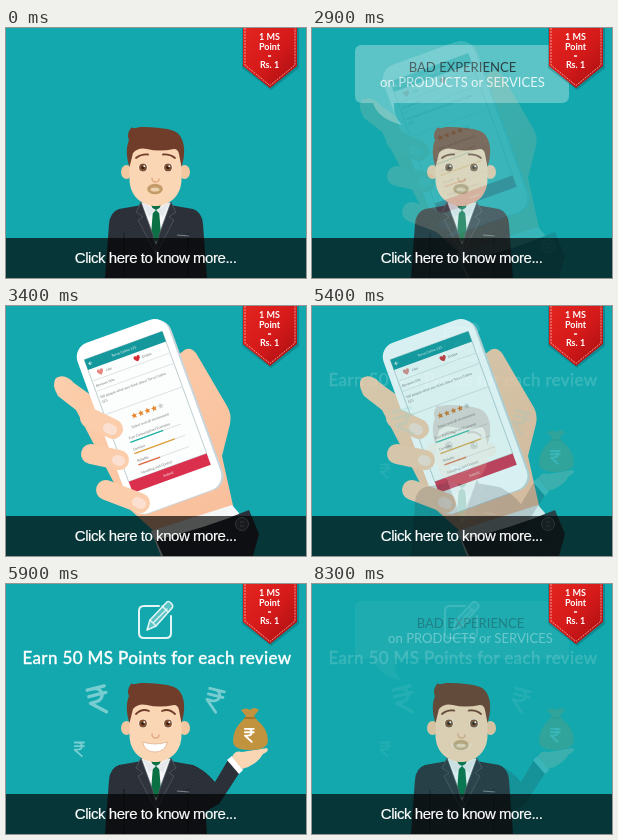
These frames come from a looping animation (300 by 250 pixels, 8400 ms). An HTML page:

```html
<!DOCTYPE html>
<html lang="en">
<head>
<meta charset="utf-8">
<title>Review rewards banner</title>
<style>
html, body { margin: 0; width: 100%; height: 100%; overflow: hidden; background: #12a8ad; }
svg { display: block; width: 300px; height: 250px; }
text { font-family: Lato, "Open Sans", sans-serif; }
.mid { text-anchor: middle; }
.line { fill: none; stroke-linecap: round; stroke-linejoin: round; }
#screen text { font-size: 3.5px; fill: #777; }
#screen .light { fill: #fff; }
</style>
</head>
<body>
<svg viewBox="0 0 300 250">
<defs>
  <pattern id="cloth" width="2" height="2" patternUnits="userSpaceOnUse" patternTransform="rotate(35)">
    <rect width="2" height="2" fill="#282c34"/><rect width=".8" height="1" fill="#3a4049"/>
  </pattern>
  <linearGradient id="red" x2="1" y2="1">
    <stop offset="0" stop-color="#e4251f"/><stop offset=".5" stop-color="#d51a1a"/><stop offset="1" stop-color="#a50d10"/>
  </linearGradient>
  <linearGradient id="skin" x2="1" y2="1">
    <stop offset="0" stop-color="#fdd0ad"/><stop offset="1" stop-color="#f8bd9a"/>
  </linearGradient>
  <path id="rupee" class="line" d="M-6-9H7M-6-4H7M-6-9H-2C6-9 6 1-2 1H-6L4 10"/>
  <path id="heart" d="M0 3C-6-1-2-5 0-2 2-5 6-1 0 3Z"/>
  <path id="star" d="M0-3 .9-1 3-.8 1.4.6 1.9 2.8 0 1.6-1.9 2.8-1.4.6-3-.8-.9-1Z"/>

  <g id="man">
    <path d="M136 177 113 181Q104 184 103 196L99 250H201L197 196Q196 184 187 181L164 177Z" fill="url(#cloth)"/>
    <path d="M118 205V250M182 205V250" stroke="#171a20" fill="none"/>
    <path d="M135 175 150 217 165 175Z" fill="#f6f7f8"/>
    <path d="M141 165H159V175L150 182 141 175Z" fill="#ecc19b"/>
    <path d="M145 176H155L153 182 155 207 150 214 145 207 147 182Z" fill="#0b7044"/>
    <path d="M135 174 130 184 137 189 132 192 150 226 147 207ZM165 174 170 184 163 189 168 192 150 226 153 207Z" fill="#30353d" stroke="#565d66" stroke-width=".7"/>
    <path d="M136 174 150 182 143 189ZM164 174 150 182 157 189Z" fill="#e6e9ec"/>
    <path d="M171 207 183 208" stroke="#7c848c"/>
    <ellipse cx="120.500" cy="144" rx="5.5" ry="7" fill="#f3c7a0"/>
    <ellipse cx="178.500" cy="144" rx="5.5" ry="7" fill="#f3c7a0"/>
    <path d="M123.500 115H175.500V151C175.500 169 162 178 149.500 178S123.500 169 123.500 151Z" fill="#fbd6b4"/>
    <path d="M123.500 139C120 128 120 119 123 112 121 108 122 103 126 99 126 101 130 100 134 99 148 99 160 100 168 103 178 107 181 123 175.500 139L173 126Q172 121 168 121 153 124 141 121 132 119 127 125Z" fill="#703d2a"/>
    <g fill="#fff"><circle cx="137" cy="139.500" r="4.6"/><circle cx="162" cy="139.500" r="4.6"/></g>
    <g fill="#84502f"><circle cx="137" cy="139.500" r="3.9"/><circle cx="162" cy="139.500" r="3.9"/></g>
    <g fill="#3a2116"><circle cx="137" cy="139.500" r="1.8"/><circle cx="162" cy="139.500" r="1.8"/></g>
    <g fill="#fff"><circle cx="138.300" cy="138.200" r="1"/><circle cx="163.300" cy="138.200" r="1"/></g>
    <path class="line" d="M146 150Q146 154 149.500 154T153 151" stroke="#e3ad85" stroke-width="1.5"/>
  </g>
</defs>

<g id="sad">
  <use href="#man"/>
  <path class="line" d="M130 130Q135 126 142 126.500M157 126.500Q164 126 169 130" stroke="#703d2a" stroke-width="1.8"/>
  <ellipse cx="149" cy="161" rx="7.800" ry="5.2" fill="#c49c6a"/>
  <ellipse cx="149" cy="161.500" rx="4.5" ry="2" fill="#edd0ae"/>
</g>

<g id="talk" fill="#fff">
  <path fill-opacity=".45" d="M50 17H250Q257 17 257 24V68Q257 75 250 75H82Q81 89 90 97 66 91 61 75H50Q43 75 43 68V24Q43 17 50 17Z"/>
</g>
<g id="words" class="mid" font-size="13.1">
  <text x="150.5" y="44" fill="#22292b">BAD EXPERIENCE</text>
  <text x="150.5" y="59" fill="#fff">on PRODUCTS or SERVICES</text>
</g>

<g id="earn">
  <g class="line" stroke="#e2f5f5" stroke-width="2">
    <path d="M153 22H138Q133 22 133 27V49Q133 54 138 54H160Q165 54 165 49V32"/>
    <path d="M141 46 144 36 160 19Q162 16 165 19T166 24L150 42Z" fill="#fff" fill-opacity=".3" stroke-width="1.6"/>
    <path d="M156 22 162 28M144 36 150 42M147 39 161 25" stroke-width="1.4"/>
  </g>
  <text class="mid" x="151" y="80" font-size="17" font-weight="500" letter-spacing=".35" fill="#fff" stroke="#fff" stroke-width=".35">Earn 50 MS Points for each review</text>
</g>

<g id="phone">
  <path d="M176 46Q183 39 190 47L221 100Q226 108 224 118L216 150 228 204 160 236 120 200 70 104 52 90Q45 78 50 72 59 67 68 77L100 100Z" fill="url(#skin)"/>
  <path d="M145 225 226 199 233 207 236 250H155Z" fill="#f4f6f7"/>
  <path d="M150 234Q200 222 243 204L253 228 247 250H157Z" fill="url(#cloth)"/>
  <g stroke="#9aa3aa"><circle cx="236" cy="218" r="6.5" fill="#4a525b"/><path d="M234 216H238M234 220H238"/></g>
  <g id="screen" transform="translate(142 106) rotate(-20)">
    <rect x="-48" y="-84" width="98" height="180" rx="15" fill="#c9d5da"/>
    <rect x="-49" y="-86" width="97" height="181" rx="15" fill="#fff"/>
    <rect x="-42" y="-71" width="83" height="130" fill="#fcfdfd" stroke="#9fb5b8" stroke-width=".6"/>
    <rect x="-42" y="-71" width="83" height="11" fill="#15989c"/>
    <path class="line" d="M-36-65.500H-39L-37.500-67M-39-65.500-37.500-64" stroke="#fff" stroke-width=".6"/>
    <text class="mid light" x="-2" y="-64">Torvo Calino 125</text>
    <use href="#heart" x="-31" y="-54" fill="#e58a83"/>
    <use href="#heart" x="8" y="-54" fill="#d42c30"/>
    <text x="-25" y="-52.500">Like</text><text x="13" y="-52.500">Dislike</text>
    <path d="M-42-48H41M-42-37H41M-42-12H41" stroke="#dfe4e5"/>
    <text x="-40" y="-41">Reviews title</text>
    <text x="-40" y="-29">Tell people what you think about Torvo Calino</text>
    <text x="-40" y="-24">125</text>
    <g id="stars"></g>
    <text class="mid" x="-1" y="10">Select overall recommend</text>
    <g id="ratings"></g>
    <text x="-27" y="56">Handling and Control</text>
    <rect x="-42" y="59" width="83" height="12" fill="#da304e"/>
    <text class="mid light" x="-2" y="66.500">Submit</text>
  </g>
  <g class="line" stroke="#fccdab" stroke-width="20">
    <path d="M84 112 107 123M85 148 113 154M100 184 134 197"/>
    <path d="M102 122 106 124M111 154 114 155M131 196 135 198" stroke="#fbe0d2" stroke-width="10"/>
  </g>
</g>

<g id="happy">
  <path d="M186 181Q197 184 209 198L222 176 234 188 213 220 184 236Z" fill="url(#cloth)"/>
  <path d="M221 176 226 172 237 186 233 190Z" fill="#fff"/>
  <path d="M226 173Q229 166 236 168L261 164Q264 167 257 170 251 181 236 185Z" fill="#fbd6b4"/>
  <use href="#man"/>
  <path class="line" d="M130 130Q136 124 143 127M156 127Q163 124 169 130" stroke="#703d2a" stroke-width="1.8"/>
  <path d="M136.500 158Q149 162 161.500 158 159 168 149 168T136.500 158Z" fill="#fff" stroke="#d9a07c" stroke-width=".6"/>
  <path d="M237 136 240 132 235 126Q240 123 244 126 248 122 253 126L248 132 251 136Q262 145 262 157 261 166 244 166T227 157Q227 145 237 136Z" fill="#c2933f"/>
  <path class="line" d="M239 134H249" stroke="#9a6d28" stroke-width="1.6"/>
  <use href="#rupee" transform="translate(243 151) scale(.68)" stroke="#fff" stroke-width="2.7"/>
  <g stroke="#77cdd0" stroke-width="2.5">
    <use href="#rupee" transform="translate(92 116) rotate(-14) scale(1.35)"/>
    <use href="#rupee" transform="translate(208 116) rotate(14) scale(1.15)"/>
    <use href="#rupee" transform="translate(73 165) scale(.72)"/>
  </g>
</g>

<path d="M236 0H293V40L265 62 236 40Z" fill="#064b4d" opacity=".3"/>
<path d="M237 0H291V38L264 60 237 38Z" fill="url(#red)"/>
<path d="M239 0V37L264 57.500 289 37V0" fill="none" stroke="#f6b9b2" stroke-width=".8" stroke-dasharray="2 1"/>
<g class="mid" font-size="9" font-weight="700" fill="#fff">
  <text x="263.500" y="12">1 MS</text><text x="263.500" y="22">Point</text>
  <text x="263.500" y="30" font-size="7">=</text><text x="263.500" y="40">Rs. 1</text>
</g>

<rect y="210" width="300" height="40" opacity=".68"/>
<text class="mid" x="149.700" y="235" font-size="15" letter-spacing="-.45" fill="#fff" stroke="#fff" stroke-width=".2" style="font-family:'Liberation Sans',Arial,sans-serif">Click here to know more...</text>
</svg>
<script>
const $ = id => document.getElementById(id);

$('stars').innerHTML = [0, 1, 2, 3, 4].map(i =>
  `<use href="#star" x="${-14 + 7 * i}" y="-1.5" fill="${i < 4 ? '#e8872f' : '#c9cfd0'}"/>`).join('');

$('ratings').innerHTML = [
  ['Fuel Consumption/Economy', 8, '#1fb5a5'],
  ['Comfort', 16, '#dfa23a'],
  ['Reliable', -4, '#e0673c']
].map(([label, end, color], i) => {
  const y = 22.5 + 12 * i;
  return `<text x="-27" y="${y - 3}">${label}</text>
    <path d="M-27 ${y}H27" stroke="#d9dfe0" stroke-width=".8"/>
    <path d="M-27 ${y}H${end}" stroke="${color}" stroke-width="1.4"/>`;
}).join('');

// Fades advance in hard steps of 100 ms.
const fade = (t, start, steps) =>
  Math.max(0, Math.min(steps, Math.floor((t - start) / 100) + 1)) / steps;

const show = (id, alpha) => { $(id).style.opacity = alpha; };

function draw(now) {
  const t = now % 8400;
  const toPhone = fade(t, 2900, 6);
  const toHappy = fade(t, 5400, 6);
  const back = fade(t, 7900, 6);
  const bubble = fade(t, 500, 5) * (1 - toPhone) + back * .4;

  show('sad', 1 - toPhone + back);
  show('talk', bubble ** 2);
  show('words', bubble);
  show('phone', toPhone - toHappy);
  show('earn', toHappy - back);
  show('happy', toHappy - back);
  $('words').setAttribute('transform', `translate(${back ? 8 : 0} 0)`);
}

const start = performance.now();
function tick() {
  draw(performance.now() - start);
  requestAnimationFrame(tick);
}
tick();
</script>
</body>
</html>
```
